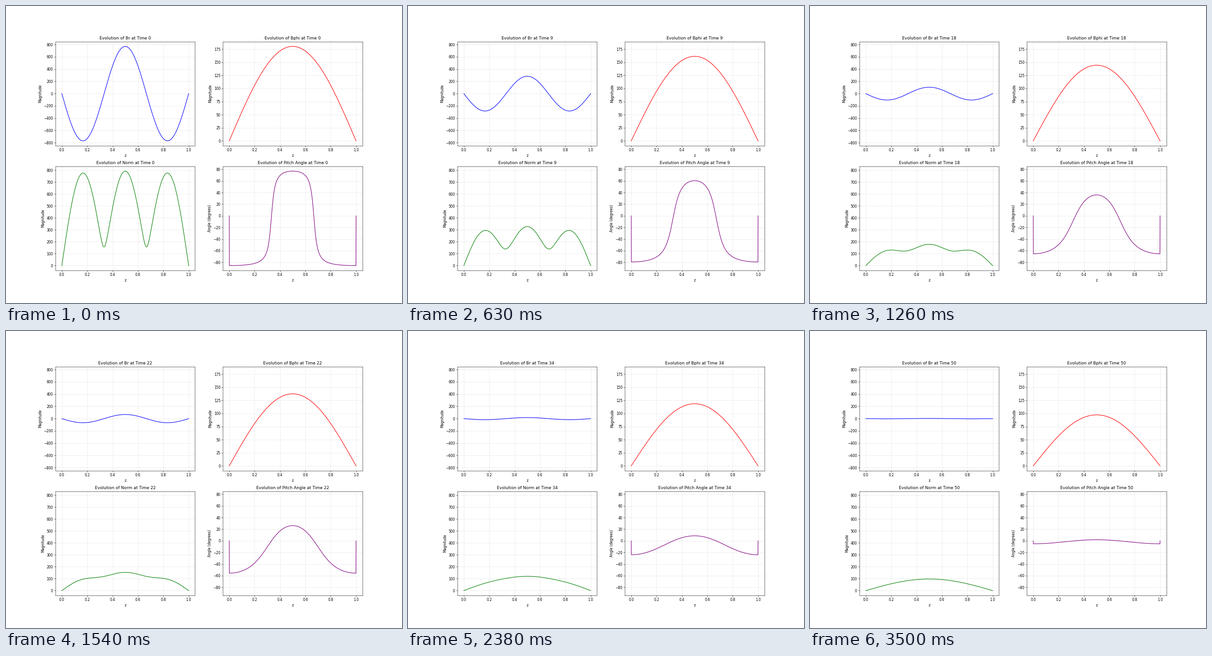
A matplotlib script that plays this animation: 864x648 px, repeating every 3.57 s.

```python
import numpy as np
import matplotlib.pyplot as plt
from matplotlib.animation import FuncAnimation

FRAMES = 51
INTERVAL = 70
DECAY = np.pi**2 * 0.00125  # decay rate of the fundamental mode per step

z = np.linspace(0, 1, 1001)


def mode(n, amplitude, t):
    """Diffusing sine mode, pinned to zero at both walls."""
    values = amplitude * np.exp(-n**2 * DECAY * t) * np.sin(n * np.pi * z)
    values[[0, -1]] = 0
    return values


def fields(t):
    br = mode(3, -771, t) + mode(1, 0.45, t)
    bphi = mode(1, 180.4, t)
    return br, bphi, np.hypot(br, bphi), np.degrees(np.arctan2(br, bphi))


PANELS = [
    ("Br", "Magnitude", "blue"),
    ("Bphi", "Magnitude", "red"),
    ("Norm", "Magnitude", "green"),
    ("Pitch Angle", "Angle (degrees)", "purple"),
]

fig, axes = plt.subplots(2, 2, figsize=(16, 12), dpi=54)
lines, titles = [], []
for ax, (name, ylabel, color), values in zip(axes.flat, PANELS, fields(0)):
    lines.append(ax.plot(z, values, color=color)[0])
    titles.append(ax.set_title(f"Evolution of {name} at Time 0"))
    ax.set_xlabel("z")
    ax.set_ylabel(ylabel)
    ax.grid(True, linestyle="--", alpha=0.5)
    ax.set_xlim(ax.get_xlim())
    ax.set_ylim(ax.get_ylim())


def update(t):
    for line, title, panel, values in zip(lines, titles, PANELS, fields(t)):
        line.set_ydata(values)
        title.set_text(f"Evolution of {panel[0]} at Time {t}")
    return lines + titles


anim = FuncAnimation(fig, update, frames=FRAMES, interval=INTERVAL,
                     repeat=True, repeat_delay=0, blit=False)
plt.show()
```
